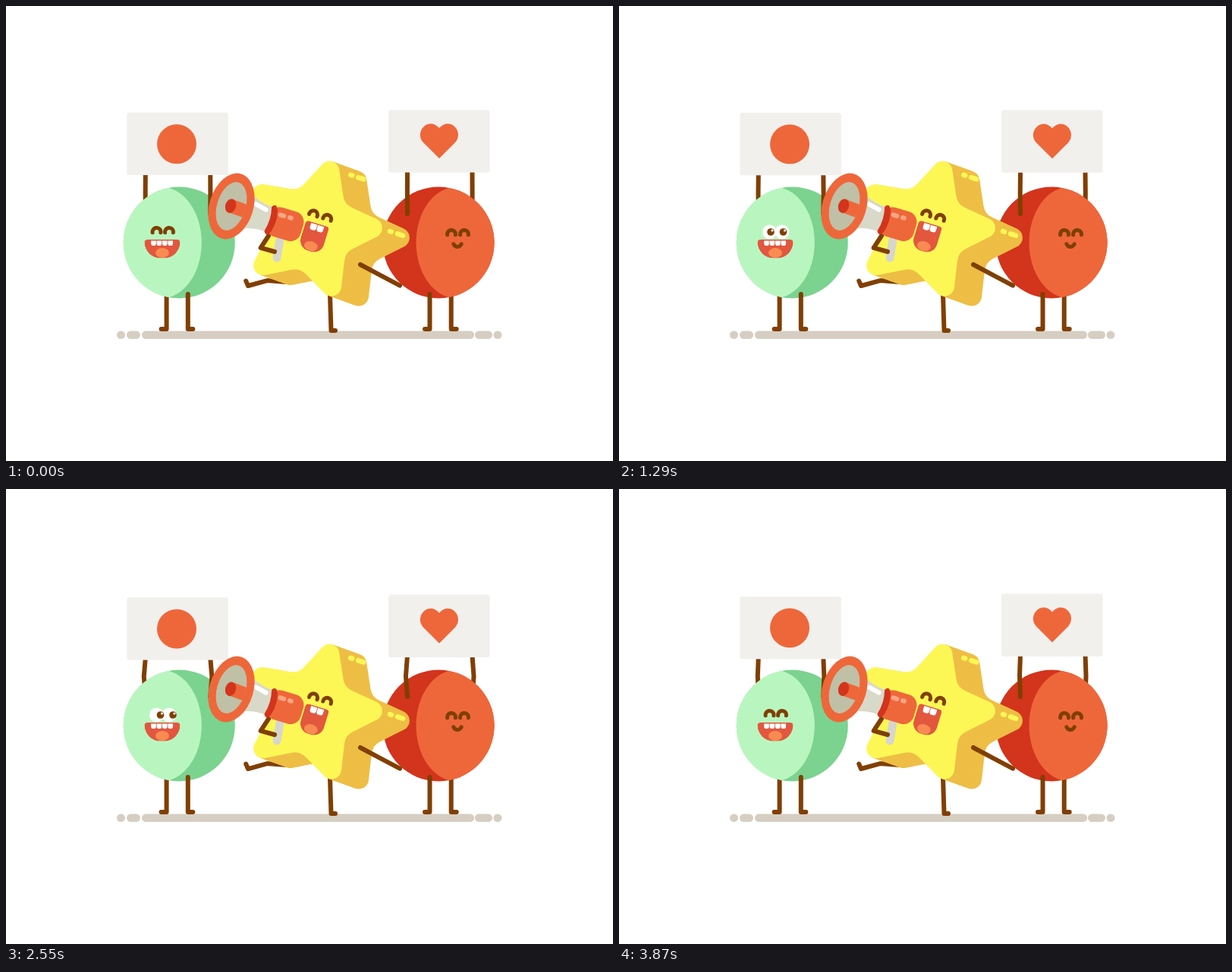
Recreate the animation shown at these times as an HTML page with a canvas. Size 800 by 600 pixels, loop 3.9 s.

```html
<!DOCTYPE html>
<html lang="en">
<head>
<meta charset="utf-8">
<title>Star rally</title>
<style>
  html, body { margin: 0; width: 100%; height: 100%; overflow: hidden; background: #fff; }
  canvas { display: block; width: 800px; height: 600px; }
</style>
</head>
<body>
<canvas id="stage" width="800" height="600"></canvas>
<script>
const ctx = document.getElementById('stage').getContext('2d');
const LOOP = 3900, SWING = LOOP / 3, BOUNCE = LOOP / 9, STEP = 30;
const TAU = Math.PI * 2, DEG = Math.PI / 180;
const C = {
  brown: '#803f02', orange: '#ee673a', red: '#d3341c', mouth: '#e2573e', tongue: '#f98b52',
  yellow: '#fdf755', amber: '#eebe45', mint: '#b9f6bf', green: '#7bd38f', shine: '#f9a584',
  card: '#f1f0ed', ground: '#d6cec2', grey: '#bfc0a6', pale: '#d9d9c9', white: '#fff'
};

// ---- drawing helpers ----
function line(points, color = C.brown, width = 6) {
  ctx.beginPath();
  for (const [x, y] of points) ctx.lineTo(x, y);
  ctx.strokeStyle = color;
  ctx.lineWidth = width;
  ctx.stroke();
}

function oval(x, y, rx, ry, color) {
  ctx.beginPath();
  ctx.ellipse(x, y, rx, ry, 0, 0, TAU);
  ctx.fillStyle = color;
  ctx.fill();
}

function box(x, y, w, h, r, color) {
  ctx.beginPath();
  ctx.roundRect(x, y, w, h, r);
  ctx.fillStyle = color;
  ctx.fill();
}

function group(draw) {
  ctx.save();
  draw();
  ctx.restore();
}

function arc(x, y, r, from, to) {
  ctx.beginPath();
  ctx.arc(x, y, r, from, to);
  ctx.strokeStyle = C.brown;
  ctx.lineWidth = 5;
  ctx.stroke();
}

const happyEye = (x, y) => arc(x, y + 2, 5.5, Math.PI - 0.15, TAU + 0.15);

// open mouth hanging down from y, with teeth and a tongue
function mouth(x, y, w, h, round, teeth, toothW) {
  group(() => {
    ctx.beginPath();
    ctx.roundRect(x - w / 2, y, w, h, [4, 4, round, round]);
    ctx.clip();
    ctx.fillStyle = C.mouth;
    ctx.fill();
    for (let i = 0; i < teeth; i++)
      box(x + (i - teeth / 2) * (toothW + 0.8), y + 1.5, toothW, toothW, [0, 0, 3.2, 3.2], C.white);
    oval(x, y + h - 7, 9, 6.5, C.tongue);
  });
}

// ---- timing ----
const power = (x, n) => x < 0.5 ? Math.pow(2 * x, n) / 2 : 1 - Math.pow(2 - 2 * x, n) / 2;
const clamp = x => Math.min(1, Math.max(0, x));

// -1 is fully left, 1 is fully right; turn is the time taken to go right
function swing(t, turn) {
  const p = t % SWING;
  return p < 705 ? 2 * power(clamp(p / turn), 4) - 1
                 : 1 - 2 * power((p - 705) / 595, 5);
}

const dip = t => 6 * (1 - Math.cos(TAU * (t - 14) / BOUNCE));

// ---- the two round friends ----
function ball(x, side, dark, light) {
  oval(x, 312, 73.5, 73.5, dark);
  group(() => {
    ctx.beginPath();
    ctx.arc(x, 312, 73.5, 0, TAU);
    ctx.clip();
    const fx = x + side * 24;
    oval(fx, 312, 53.5, 73.5, light);
    ctx.fillRect(side < 0 ? fx - 80 : fx, 230, 80, 160);
  });
}

function friend(x, side, dark, light, top) {
  const d = dip(now), cardY = top + d, hand = cardY + 80, elbow = 246 + d / 2;
  const leg = (lx, y, toe) => line([[lx, y], [lx, 426], [lx + toe, 426]]);
  const arm = (ax, y, out) => line([[ax, hand], [ax + out * d * 0.85, elbow], [ax, y]]);
  leg(x + side * 16.7, 370, side * 7);
  arm(x + side * 44.5, 272, side);
  ball(x, side, dark, light);
  leg(x - side * 11.5, 380, -side * 6.5);
  arm(x - side * 41, 274, -side);
  box(x + side * 1.5 - 67.5, cardY, 133.5, 82.5, 3, C.card);
}

function heart(x, y) {
  ctx.beginPath();
  ctx.moveTo(x, y + 23);
  for (const s of [-1, 1]) {
    const tip = s < 0 ? [x, y - 17] : [x, y + 23];
    if (s < 0) ctx.lineTo(x - 21, y + 2);
    if (s < 0) ctx.bezierCurveTo(x - 34, y - 13, x - 13, y - 33, ...tip);
    else ctx.bezierCurveTo(x + 13, y - 33, x + 34, y - 13, x + 21, y + 2);
  }
  ctx.fillStyle = C.orange;
  ctx.fill();
}

function greenFace() {
  const open = now >= SWING / 2 && now < SWING * 2;
  const look = 5.5 * power(clamp((now - 1200) / 200), 3);
  const eyes = [198.5, 215];
  if (open) for (const x of eyes) oval(x, 298, 9.5, 9.5, C.white);
  for (const x of eyes) {
    if (open) {
      oval(x + look - 0.5, 298, 4.8, 4.8, C.brown);
      oval(x + look + 1.5, 296, 1.6, 1.6, C.white);
    } else happyEye(x, 296);
  }
  mouth(206, 308, 47, 24.5, 23, 4, 6.6);
}

function redFace() {
  happyEye(587, 299);
  happyEye(604, 299);
  arc(595, 312, 5.5, 0.35, Math.PI - 0.35);
}

function ground() {
  const bar = (x, w) => box(x, 428.5, w, 10.5, 5.25, C.ground);
  bar(146, 11);
  bar(159, 18);
  bar(179, 438);
  bar(618, 23);
  bar(642.5, 11);
}

// ---- the star, drawn facing right; a is how far it has turned ----
function starPath() {
  const corner = i => {
    const r = i % 2 ? 54 : 110, k = i * Math.PI / 5;
    return [r * Math.sin(k), -r * Math.cos(k)];
  };
  const a = corner(9), b = corner(0);
  ctx.beginPath();
  ctx.moveTo((a[0] + b[0]) / 2, (a[1] + b[1]) / 2);
  for (let i = 0; i < 10; i++) ctx.arcTo(...corner(i), ...corner(i + 1), i % 2 ? 20 : 13);
  ctx.closePath();
}

function starBody(a, cx, cy, tilt) {
  const depth = Math.pow(a, 1.3), ex = -36 * depth, ey = 13 * depth;
  const layer = (k, color) => group(() => {
    ctx.translate(cx + ex * k, cy + ey * k);
    ctx.rotate(tilt);
    starPath();
    ctx.fillStyle = color;
    ctx.fill();
  });
  for (let i = 36; i > 0; i--) layer(i / 36, C.amber);

  // glints on the two lit edges
  const glint = (turn, x, y) => {
    const k = tilt + turn, tx = cx + 93 * Math.sin(k), ty = cy - 93 * Math.cos(k);
    const dash = (from, to) => line([from, to].map(
      u => [tx + (x - u) * depth, ty + (y + u / 3) * depth]), C.yellow, 6.5 * depth);
    dash(-1, 1);
    dash(9, 16);
  };
  if (a > 0.25) {
    glint(0, -25, 18);
    glint(-TAU / 5, -11, 5);
  }
  layer(0, C.yellow);
}

function starFace(a, cx, cy, tilt) {
  group(() => {
    ctx.translate(cx, cy);
    ctx.rotate(tilt);
    ctx.translate(-6 * a, 0);
    happyEye(-9.5, -20.5);
    happyEye(9.5, -20.5);
    mouth(0.5, -9, 32, 24 + 14 * a * a, 14, 2, 8.5);
  });
}

// two equal bones of the given length between two points
function limb([x0, y0], [x1, y1], bone, bend, ...rest) {
  const dx = x1 - x0, dy = y1 - y0, d = Math.hypot(dx, dy);
  const out = bend * Math.sqrt(Math.max(0, bone * bone - d * d / 4)) / d;
  line([[x0, y0], [(x0 + x1) / 2 - dy * out, (y0 + y1) / 2 + dx * out], [x1, y1], ...rest]);
}

function legs(a) {
  limb([373, 392 - 12 * a], [371.5, 428], 23, 1, [366, 428]);
  const foot = [429 + 52 * a, 428 - 59 * Math.pow(a, 2.2)], toe = -67 * a * a * DEG;
  limb([427 + 3 * a, 392 - 28 * a], foot, 23 + 3 * a, -1,
       [foot[0] + 7 * Math.cos(toe), foot[1] + 7 * Math.sin(toe)]);
}

function freeArm(a) {
  const lift = a * a * a, x = 342 - 9 * lift, y = 353 - 12 * lift;
  const angle = 152 * DEG * Math.sin(a * Math.PI / 2);
  const reach = 59 - 20 * Math.pow(1 - a, 3);
  limb([x, y], [x + reach * Math.cos(angle), y + reach * Math.sin(angle)], 29, 1);
}

function holdingArm(a) {
  const x = 419 + 27 * a, y = 353 - 29 * Math.pow(a, 4);
  line([[x - 7, y - 16], [x - 3, y + 8]], '#d6d6ce', 11);
  limb([458 - 4 * a, 353 - 50 * a * a], [x, y], 29 - 10 * a, -1);
}

function megaphone(a) {
  const neck = 5 + 50 * a, grip = 10 + 33 * a;
  group(() => {
    ctx.translate(400 + 103 * a, 341 - 77 * Math.pow(a, 2.2));
    ctx.rotate(-17 * a * a * DEG);

    // grip with its collar
    box(-neck - grip, -18, grip + 4, 40, Math.min(14, grip / 2), C.orange);
    if (a > 0.7) {
      line([[-neck - 25, -8], [-neck - 23, -8]], C.shine);
      line([[-neck - 15, -8], [-neck - 10, -8]], C.shine);
    }
    oval(-neck, 2, 7, 20, C.red);

    // flared horn
    ctx.beginPath();
    ctx.moveTo(0, -40);
    ctx.quadraticCurveTo(-neck * 0.4, -16, -neck + 4, -15);
    ctx.quadraticCurveTo(-neck - 1, 2, -neck + 4, 19);
    ctx.quadraticCurveTo(-neck * 0.4, 17, 0, 40);
    ctx.fillStyle = C.pale;
    ctx.fill();
    if (a > 0.5) line([[-neck + 10, -9], [-neck * 0.55, -12]], C.white);

    // rim and inside
    oval(0, 0, 45 - 16 * a, 44.5, C.orange);
    ctx.beginPath();
    ctx.ellipse(0, 0, 31 - 12 * a, 33, 0, 0, TAU);
    ctx.clip();
    ctx.fillStyle = C.grey;
    ctx.fill();
    line([[-22 * a, 1], [-1, 0]], C.orange, 25 - 7 * a);
    oval(1, 0, 9 - 2 * a, 9.5, C.red);
  });
}

function star() {
  const s = swing(now, 695), a = Math.abs(s), tilt = -17 * a * DEG;
  const cx = 400 - 3 * a, cy = 332 - 38 * a * a;
  const facing = (dir, draw) => group(() => {
    ctx.translate(400, 0);
    ctx.scale(dir < 0 ? -1 : 1, 1);
    ctx.translate(-400, 0);
    draw();
  });
  facing(s, () => {
    legs(a);
    starBody(a, cx, cy, tilt);
    starFace(a, cx, cy, tilt);
  });
  // the megaphone runs slightly ahead of the body
  const lead = swing(now, 670), b = Math.abs(lead);
  facing(lead, () => {
    freeArm(b < 0.3 ? b : a);
    holdingArm(b);
    megaphone(b);
  });
}

let now = 0;

function draw() {
  now = Math.floor((performance.now() % LOOP) / STEP) * STEP;
  ctx.fillStyle = C.white;
  ctx.fillRect(0, 0, 800, 600);
  ctx.lineCap = ctx.lineJoin = 'round';
  ground();
  friend(228.3, -1, C.green, C.mint, 140.5);
  friend(570, 1, C.red, C.orange, 137);
  oval(225, 182 + dip(now), 26, 26, C.orange);
  heart(571, 178 + dip(now));
  greenFace();
  redFace();
  star();
  requestAnimationFrame(draw);
}
draw();
</script>
</body>
</html>
```
